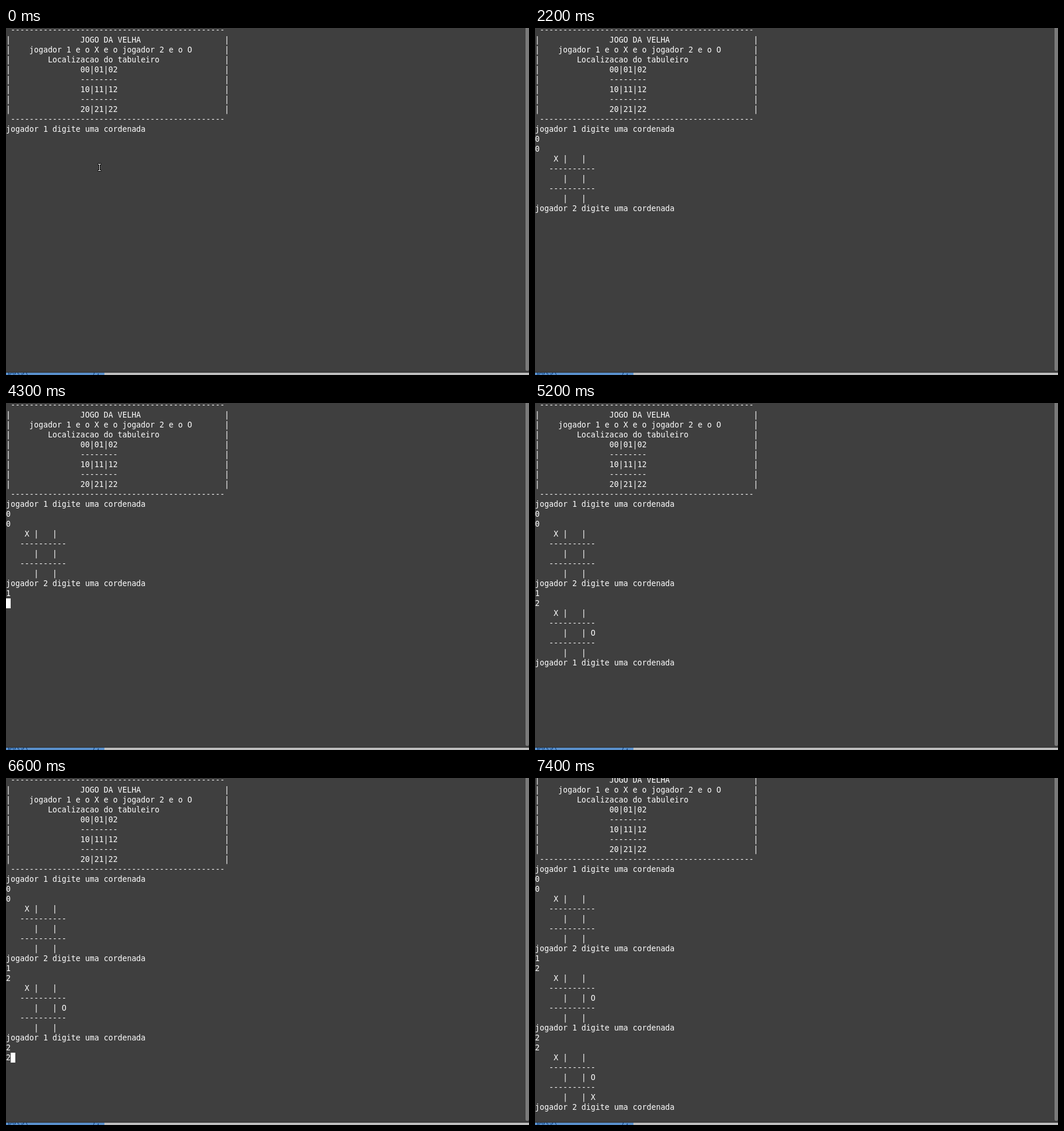
Recreate the animation shown at these times as an HTML page. Size 898 by 595 pixels, loop 8000 ms.

```html
<!DOCTYPE html>
<html lang="pt">
<head>
<meta charset="utf-8">
<title>Jogo da velha</title>
<style>
  html, body { margin: 0; width: 100%; height: 100%; overflow: hidden; background: #3f3f3f; }
  body { position: relative; }
  pre { margin: 0; font-family: "DejaVu Sans Mono", monospace; }
  #term, #bar, #edge, #editor, #mouse { position: absolute; }
  #term { left: 0; top: 0; width: 892px; height: 590px; overflow: hidden; }
  #screen { position: absolute; left: 0; top: -5px; }
  #text { color: #fff; font-size: 13.288px; line-height: 17px; }
  #caret { position: absolute; width: 8px; height: 17px; background: #fff; }
  #bar { left: 892px; top: -10px; width: 6px; height: 598px; border-radius: 0 0 3px 3px; background: #7a7a7a; }
  #edge { left: 0; top: 590px; width: 898px; height: 1px; background: #2b2b2b; }
  #editor { left: 0; top: 591px; width: 898px; height: 4px; overflow: hidden; background: #bdbdbd; }
  #editor pre {
    position: absolute; left: 0; top: -9px; width: 166px; padding-left: 3px;
    background: #5a90cb; color: #0c3c78; font-size: 12px; line-height: 16px;
  }
  #mouse { left: 155px; top: 232px; }
</style>
</head>
<body>
<div id="term"><div id="screen"><pre id="text"></pre><div id="caret"></div></div></div>
<div id="bar"></div>
<div id="edge"></div>
<div id="editor"><pre>puts("   ----------");</pre></div>
<svg id="mouse" width="11" height="15" fill="none">
  <path id="beam" d="M2.5 1.5H8.5M5.5 1.5V12.5M2.5 12.5H8.5" stroke="#000" stroke-width="3"/>
  <path d="M3 1.5H8M5.5 1.5V12.5M3 12.5H8" stroke="#fff"/>
</svg>
<script>
  const LOOP = 8000, ROW = 17, COL = 8, ROWS = 35;
  const $ = id => document.getElementById(id);
  const text = $('text'), caret = $('caret'), screen = $('screen'), mouse = $('mouse');

  const rule = ' ' + '-'.repeat(46);
  const boxed = (indent, s) => '|' + (' '.repeat(indent) + s).padEnd(46) + '|';
  const prompt = player => `jogador ${player} digite uma cordenada\n`;
  const split = '   ' + '-'.repeat(10);
  const board = (mid, low) =>
    ['\n    X |   |', split, '      |   | ' + mid, split, '      |   | ' + low, ''].join('\n');

  const header = [
    rule,
    boxed(15, 'JOGO DA VELHA'),
    boxed(4, 'jogador 1 e o X e o jogador 2 e o O'),
    boxed(8, 'Localizacao do tabuleiro'),
    boxed(15, '00|01|02'),
    boxed(15, '--------'),
    boxed(15, '10|11|12'),
    boxed(15, '--------'),
    boxed(15, '20|21|22'),
    rule, ''
  ].join('\n');

  // [start in ms, appended output, caret visible]
  const steps = [
    [0, header + prompt(1), 0], [100, '', 1], [700, '', 0],
    [1000, '0', 1], [1100, '\n', 1], [1300, '0', 1],
    [1600, board('', '') + prompt(2), 1], [2200, '', 0], [2800, '', 1], [3400, '', 0], [4000, '', 1],
    [4100, '1', 1], [4300, '\n', 1], [4500, '2', 1],
    [4600, board('O', '') + prompt(1), 1], [5200, '', 0], [5800, '', 1],
    [6300, '2', 1], [6500, '\n', 1], [6600, '2', 1],
    [6800, board('O', 'X') + prompt(2), 1], [7400, '', 0]
  ];

  let shown = -1;
  function draw(now) {
    const t = now % LOOP;
    mouse.style.visibility = t < 900 ? 'visible' : 'hidden';
    const past = steps.filter(s => s[0] <= t);
    if (past.length !== shown) {
      shown = past.length;
      const out = past.map(s => s[1]).join('');
      const lines = out.split('\n'), row = lines.length - 1;
      text.textContent = out;
      caret.style.left = lines[row].length * COL + 'px';
      caret.style.top = row * ROW + 'px';
      caret.style.visibility = past[shown - 1][2] ? 'visible' : 'hidden';
      screen.style.top = -5 - Math.max(0, lines.length - ROWS) * ROW + 'px';
    }
  }

  const start = performance.now();
  function tick() {
    draw(performance.now() - start);
    requestAnimationFrame(tick);
  }
  tick();
</script>
</body>
</html>
```
